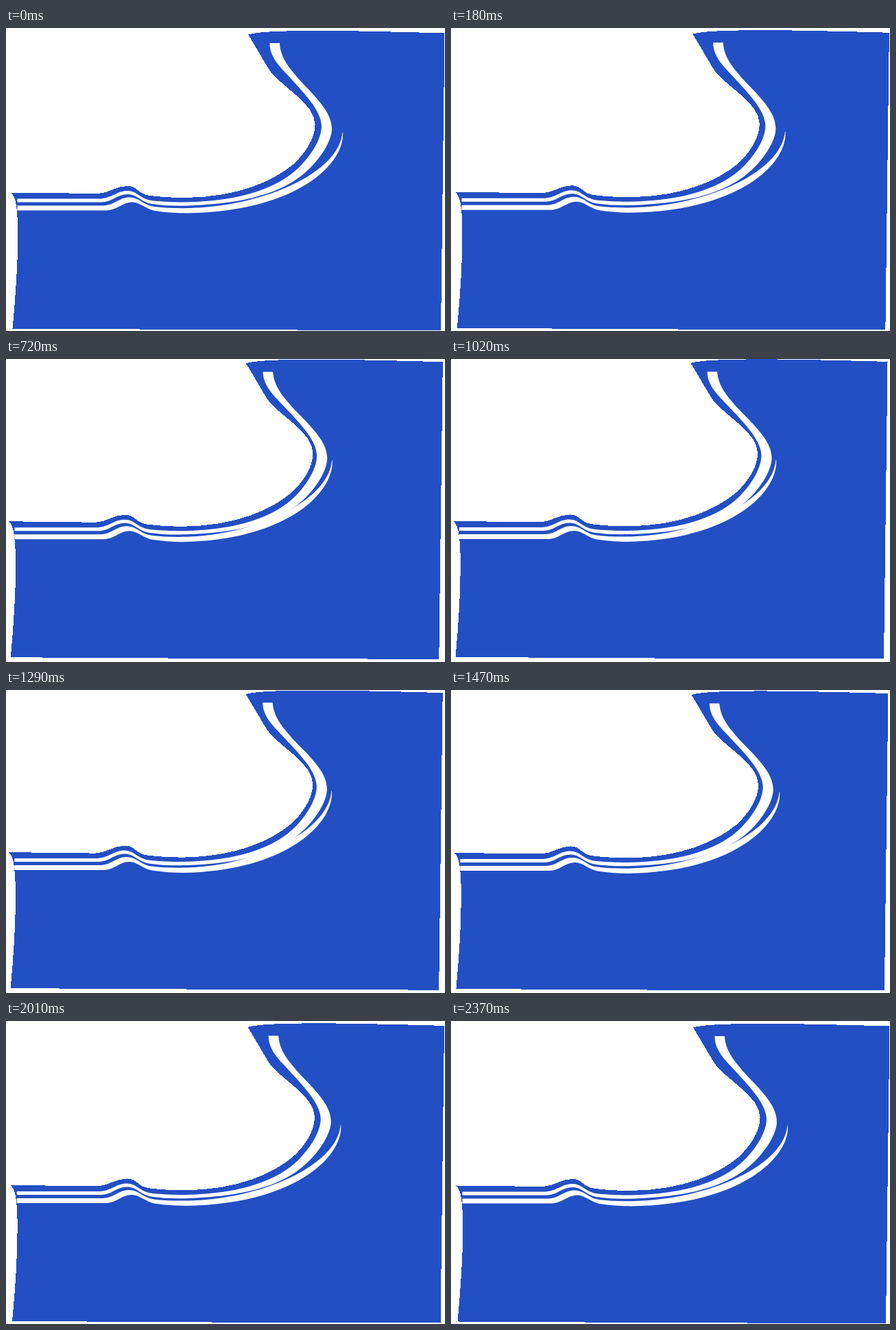
Animation, 640 px wide and 441 px high, one loop 2400 ms. Source, as an HTML page:

```html
<!DOCTYPE html>
<html lang="en">
<head>
<meta charset="utf-8">
<title>Wave</title>
<style>
  html, body { margin: 0; width: 100%; height: 100%; overflow: hidden; background: #fff; }
  svg { display: block; width: 640px; height: 441px; }
</style>
</head>
<body>
<svg viewBox="0 0 640 441">
  <path id="body" fill="#234fc4" shape-rendering="crispEdges"/>
  <path id="inner" fill="#fff"/>
  <path id="outer" fill="#fff"/>
</svg>
<script>
const LOOP = 2400, STEP = 30;

// Sway over time: [ms, amount]
const keys = [[0, 0], [360, .53], [720, .9], [1110, 1], [1290, .94], [1650, .45], [2010, .16], [LOOP, 0]];

const clamp = v => Math.min(1, Math.max(0, v));

// Each shape has a resting path and a rule for how far its points lean at full sway.
const shapes = {
  body: {
    path: `M7 239.5 L134 241 C150 240.5 160 230 177 230 C192 230 192 242 210 244
      C226 246 245 247 262 247 C340 246 390 222 418 199 C436 183 451 160 450.5 140
      C450 110 404 87 386 64 C380 56 370 37 353 9.5 C370 4 430 4 460 4
      C520 4 580 6 639.5 7.5 L634 440 L340 439.3 L9.5 437.5
      C15 380 18 330 17 285 C16 262 15 246 7 239.5Z`,
    lean: (x, y) => [1.5 * Math.max(x / 640, y / 441), 0]
  },
  inner: {
    path: `M16.5 248.5 L138 248.5 C155 247 162 237 177 237 C192 237 196 250 215 251.5
      C232 253 245 253.5 262 253.5 C345 252 397 232 427 203 C446 184 460 161 460 143
      C460 120 433 93 411 69 C395 52 384.5 40 384.5 22 L399 22
      C400 44 414 60 432 80 C455 104 475 124 475 147 C475 165 456 196 428 217
      C390 245 335 256 268 258.5 C250 259 232 259 212 256
      C196 253 192 242 177 242 C162 242 155 253 140 253.5 L16.5 253.5Z`,
    lean: (x, y) => [x > 300 ? -6.5 * clamp((252 - y) / 230) : 0, 0]
  },
  outer: {
    path: `M16.5 258.5 L142 258.5 C158 258 165 246.5 180 246.5 C195 246.5 200 258 216 260
      C232 262 250 262.5 268 262 C370 260 485 213 490.5 152 L491 152
      C494 200 420 268 262 269.5 C250 269.5 235 268.5 220 266.5
      C205 265 196 253.5 184 253.5 C170 253.5 162 265 147 265.5 L16.5 265.5Z`,
    lean: x => {
      const k = clamp((x - 262) / 228);
      return [-12.5 * k, -1.8 * k];
    }
  }
};

const slope = i => {
  const a = keys[i - 1], b = keys[i + 1];
  return a && b ? (b[1] - a[1]) / (b[0] - a[0]) : 0;
};

// Smooth cubic through the keys
function sway(t) {
  let i = 0;
  while (t >= keys[i + 1][0]) i++;
  const [t0, p0] = keys[i], [t1, p1] = keys[i + 1];
  const d = t1 - t0, u = (t - t0) / d, v = 1 - u;
  return v * v * ((1 + 2 * u) * p0 + u * d * slope(i)) +
         u * u * ((3 - 2 * u) * p1 - v * d * slope(i + 1));
}

function draw(t) {
  const p = sway(t);
  for (const id in shapes) {
    const { path, lean } = shapes[id];
    const d = path.replace(/([\d.]+) ([\d.]+)/g, (_, x, y) => {
      const [dx, dy] = lean(+x, +y);
      return `${(+x + p * (dx - 4.5)).toFixed(2)} ${(+y + p * (dy - 3.6)).toFixed(2)}`;
    });
    document.getElementById(id).setAttribute("d", d);
  }
}

let start;
function tick(now) {
  start ??= now;
  const t = Math.max(0, now - start) % LOOP;
  draw(Math.floor(t / STEP) * STEP);
  requestAnimationFrame(tick);
}
draw(0);
requestAnimationFrame(tick);
</script>
</body>
</html>
```
